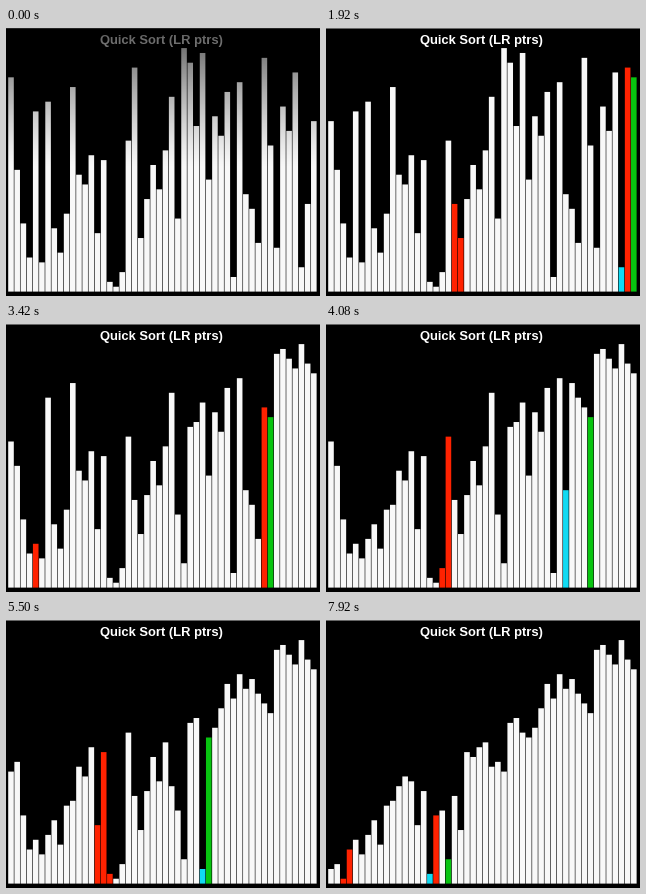
A matplotlib script that plays this animation: 314 px wide and 268 px high, repeating every 8000 ms.

```python
import numpy as np
import matplotlib.pyplot as plt
from matplotlib.animation import FuncAnimation
from matplotlib.collections import PolyCollection
from matplotlib.patches import Rectangle

W, H = 314, 268
LOOP, TICK = 8000, 20          # ms
STEPS_PER_MS = 12 / 1000       # the picture advances 12 times a second
LEFT, PITCH, BAR, FLOOR, UNIT = 2.2, 6.18, 5.6, 263.6, 4.87

WHITE, RED, GREEN, CYAN = "#f8f8f8", "#ff2200", "#08c410", "#10daf2"

VALUES = [44, 25, 14, 7, 37, 6, 39, 13, 8, 16, 42, 24, 22, 28, 12, 27, 2,
          1, 4, 31, 46, 11, 19, 26, 21, 29, 40, 15, 50, 47, 34, 49, 23, 36,
          32, 41, 3, 43, 20, 17, 10, 48, 30, 9, 38, 33, 45, 5, 18, 35]

# Sorting pace: picture step -> number of array accesses made
PACE_STEP = [11, 12, 23, 34, 49, 66, 80, 95]
PACE_COUNT = [0, 1, 29.2, 59.2, 98.7, 145.1, 183.2, 222.2]


def quick_sort(a, lo, hi):
    """Yield (values, accessed indices, pivot index, pointers) per access."""
    def look(*idx, p=None, ptrs=()):
        return a.copy(), idx, p, ptrs

    p, pivot = lo, a[lo]
    yield look(p)
    i, j = lo, hi
    while i <= j:
        yield look(i, p=p, ptrs=(i, j))
        while a[i] < pivot:
            i += 1
            yield look(i, p=p, ptrs=(i, j))
        yield look(j, p=p, ptrs=(i, j))
        while a[j] > pivot:
            j -= 1
            yield look(j, p=p, ptrs=(i, j))
        if i <= j:
            yield look(i, j, p=p, ptrs=(i, j))
            a[i], a[j] = a[j], a[i]
            yield look(i, j, p=p, ptrs=(i, j))
            p = {i: j, j: i}.get(p, p)
            i, j = i + 1, j - 1
    if lo < j:
        yield from quick_sort(a, lo, j)
    if i < hi:
        yield from quick_sort(a, i, hi)


states = [(VALUES.copy(), (), None, ())]
states += quick_sort(VALUES.copy(), 0, len(VALUES) - 1)


def accesses(step):
    return int(np.interp(step, PACE_STEP, PACE_COUNT))


def bar_shapes(values):
    shapes = []
    for k, v in enumerate(values):
        x0, top = LEFT + PITCH * k, FLOOR - UNIT * v
        x1 = x0 + BAR
        shapes.append([(x0, FLOOR), (x0, top), (x1, top), (x1, FLOOR)])
    return shapes


def bar_colors(step):
    """Current access beats the watched indices, which beat recent accesses."""
    now = accesses(step)
    colors = [WHITE] * len(VALUES)
    for n in range(accesses(step - 1) + 1, now + 1):
        for k in states[n][1]:
            colors[k] = RED
    _, hot, pivot, pointers = states[now]
    for k in pointers:
        if 0 <= k < len(colors):
            colors[k] = CYAN
    if pivot is not None:
        colors[pivot] = GREEN
    for k in hot:
        colors[k] = RED
    return colors


fig = plt.figure(figsize=(W / 100, H / 100), dpi=100, facecolor="black")
ax = fig.add_axes([0, 0, 1, 1])
ax.axis("off")

# Without snapping the bars keep soft edges and grey gaps
bars = PolyCollection(bar_shapes(VALUES), facecolors=WHITE, linewidths=0,
                      snap=False)
ax.add_collection(bars)
ax.add_patch(Rectangle((0, 0), W, 1, color="#666666", linewidth=0))
ax.text(155.4, 16, "Quick Sort (LR ptrs)", color="white", fontsize=9.4,
        family="Liberation Sans", weight="bold", ha="center", va="baseline")

# Dark veil over the upper half of the opening picture
veil = np.zeros((H, 1, 4))
veil[:, 0, 3] = 0.65 * np.clip(1 - np.arange(H) / 140, 0, 1) ** 1.3
shade = ax.imshow(veil, extent=(0, W, H, 0), aspect="auto",
                  interpolation="nearest", zorder=5)
ax.set_xlim(0, W)
ax.set_ylim(H, 0)


def draw(n):
    step = int((n * TICK + TICK / 2 + 5) * STEPS_PER_MS)
    step = min(step, PACE_STEP[-1])
    bars.set_verts(bar_shapes(states[accesses(step)][0]))
    bars.set_facecolor(bar_colors(step))
    shade.set_alpha(float(np.clip((13 - step) / 2, 0, 1)))
    shade.set_visible(step < 13)
    return bars, shade


anim = FuncAnimation(fig, draw, frames=LOOP // TICK, interval=TICK,
                     repeat=True, repeat_delay=0, blit=False)
plt.show()
```
